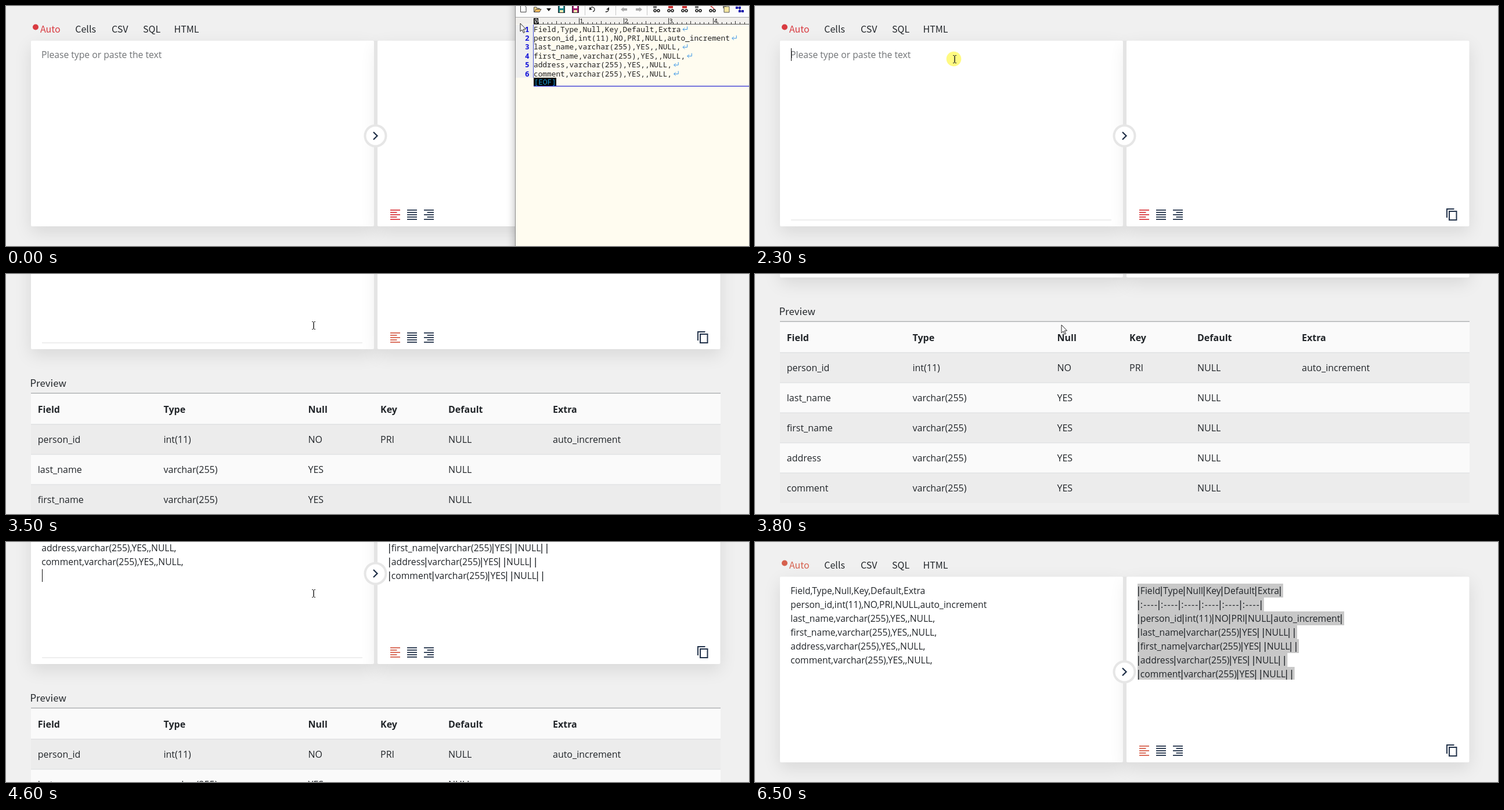
An HTML page with a canvas that plays this animation: 1280 px wide and 415 px high, repeating every 6600 ms.

```html
<!DOCTYPE html>
<html lang="en">
<head>
<meta charset="utf-8">
<title>CSV to Markdown table</title>
<style>
html, body { margin: 0; width: 100%; height: 100%; overflow: hidden; background: #f0f0f0; }
canvas { display: block; width: 1280px; height: 415px; }
</style>
</head>
<body>
<canvas id="stage" width="1280" height="415"></canvas>
<script>
const ctx = document.getElementById('stage').getContext('2d');
const LOOP = 6600, STEP = 100;
const NAVY = '#22324a', INK = '#212529';
const UI = "'Noto Sans CJK JP', 'Noto Sans', sans-serif";
const BODY = "'Open Sans', 'Noto Sans', sans-serif";
const MONO = "'Noto Sans Mono', 'DejaVu Sans Mono', monospace";

const csv = [
  'Field,Type,Null,Key,Default,Extra',
  'person_id,int(11),NO,PRI,NULL,auto_increment',
  'last_name,varchar(255),YES,,NULL,',
  'first_name,varchar(255),YES,,NULL,',
  'address,varchar(255),YES,,NULL,',
  'comment,varchar(255),YES,,NULL,'
];
const cells = csv.map(line => line.split(','));
const markdown = cells.map(row => '|' + row.map(c => c || ' ').join('|') + '|');
markdown.splice(1, 0, '|' + ':----|'.repeat(6));

const mousePath = [
  [0, 886, 31], [200, 909, 40], [800, 1172, 130], [1300, 1176, 137],
  [1500, 1120, 150], [2000, 344, 92], [2400, 344, 92], [2700, 530, 89],
  [4700, 530, 89], [4900, 570, 118], [5600, 1203, 360], [6100, 1203, 360],
  [6400, 1204, 372]
];
const scrollPath = [
  [2850, 0], [3500, 251], [3800, 375], [4250, 375], [4600, 170], [4900, 0]
];

// Linear interpolation along [time, ...values] points
function along(points, t) {
  let i = points.findIndex(p => p[0] > t);
  if (i < 0) return points[points.length - 1].slice(1);
  if (i === 0) return points[0].slice(1);
  const a = points[i - 1], b = points[i], k = (t - a[0]) / (b[0] - a[0]);
  return a.slice(1).map((v, n) => v + (b[n + 1] - v) * k);
}

function rect(x, y, w, h, color) {
  ctx.fillStyle = color;
  ctx.fillRect(x, y, w, h);
}

function text(s, x, y, font, color) {
  ctx.font = font;
  ctx.fillStyle = color;
  ctx.fillText(s, x, y);
}

function disc(x, y, r, color) {
  ctx.fillStyle = color;
  ctx.beginPath();
  ctx.arc(x, y, r, 0, 7);
  ctx.fill();
}

function path(points, closed) {
  ctx.beginPath();
  for (let i = 0; i < points.length; i += 2) ctx.lineTo(points[i], points[i + 1]);
  if (closed) ctx.closePath();
}

function stroke(points, color, width = 1, closed = false) {
  path(points, closed);
  ctx.strokeStyle = color;
  ctx.lineWidth = width;
  ctx.stroke();
}

function shape(points, fill, edge) {
  path(points, true);
  ctx.fillStyle = fill;
  ctx.fill();
  if (edge) {
    ctx.strokeStyle = edge;
    ctx.lineWidth = 1;
    ctx.stroke();
  }
}

function panel(x, w) {
  ctx.save();
  ctx.shadowColor = 'rgba(0,0,0,.1)';
  ctx.shadowBlur = 30;
  ctx.shadowOffsetY = 10;
  ctx.fillStyle = '#fff';
  ctx.beginPath();
  ctx.roundRect(x, 60, w, 321, 2);
  ctx.fill();
  ctx.restore();
}

function alignIcon(x, color, short, right) {
  for (let i = 0; i < 5; i++) {
    const w = short && i % 2 ? 11.5 : 17;
    rect(right ? x + 17 - w : x, 352 + i * 4, w, 1.8, color);
  }
}

// Draws pipes as narrow bars and returns the right end
function pipedLine(s, x, y) {
  ctx.letterSpacing = s[1] === ':' ? '1.2px' : '0px';
  s.split('|').forEach((part, i) => {
    if (i) {
      rect(x + 1, y - 13, 1.4, 17, INK);
      x += 4.8;
    }
    text(part, x, y, `500 15.7px ${BODY}`, INK);
    x += ctx.measureText(part).width;
  });
  ctx.letterSpacing = '0px';
  return x;
}

function output(selected) {
  markdown.forEach((line, i) => {
    const y = 90 + i * 24;
    const end = pipedLine(line, 659, y);
    if (!selected) return;
    rect(659, y - 18, end + 2 - 659, i < 6 ? 24 : 22, '#c8c8c8');
    pipedLine(line, 659, y);
  });
}

function table() {
  text('Preview', 41.5, 446, `500 16.8px ${UI}`, INK);
  rect(43, 458, 1188, 52, '#fafafa');
  rect(43, 456.5, 1188, 1.3, '#a9abad');
  const columns = [54.8, 271.5, 520.5, 645, 762, 942];
  cells.forEach((row, r) => {
    if (r) rect(43, 459 + r * 52, 1188, 52, r % 2 ? '#ececec' : '#fafafa');
    if (r) rect(43, 458.5 + r * 52, 1188, 1, '#dcdedf');
    const font = `${r ? 400 : 700} 16px ${BODY}`;
    row.forEach((s, c) => text(s, columns[c], r ? 491 + r * 52 : 490.5, font, INK));
  });
}

function page(t, scroll) {
  const pasted = t >= 2600;
  const focused = t >= 2200 && t < 4900;
  const accent = pasted ? '#d6604d' : '#d93b41';
  rect(0, 0, 1280, 415, '#f0f0f0');
  ctx.save();
  ctx.translate(0, -Math.round(scroll));

  disc(51, 36.5, 5, accent);
  const tabs = [['Auto', 59], ['Cells', 119.3], ['CSV', 182], ['SQL', 236], ['HTML', 289.5]];
  tabs.forEach(([s, x], i) => text(s, x, 46, `500 16px ${UI}`, i ? INK : accent));

  panel(43, 591);
  panel(640, 590.5);
  rect(634, 60, 6, 321, '#e4e4e4');
  if (focused) rect(62, 369.5, 552, 1, '#dedede');

  if (pasted) {
    csv.forEach((s, i) => text(s, 61.2, 90 + i * 24, `500 15.65px ${BODY}`, INK));
    output(t >= 5900);
  } else {
    text('Please type or paste the text', 61, 90, `500 15.7px ${BODY}`, '#707376');
  }
  const blink = (t - 2450) % 1060 < 530;
  if (t >= 2200 && t < 5600 && blink) rect(62, pasted ? 217 : 73, 1, 22, '#111');

  alignIcon(662, accent, true);
  alignIcon(691, NAVY);
  alignIcon(720, NAVY, true, true);
  stroke([1192, 366, 1192, 351, 1204.5, 351], NAVY, 2);
  stroke([1196, 355, 1208.5, 355, 1208.5, 370, 1196, 370], NAVY, 2, true);

  disc(636.5, 224.5, 20, '#e6e6e6');
  disc(636.5, 224.5, 16, '#fff');
  stroke([633, 218, 639.5, 224.5, 633, 231], NAVY, 2.3);

  if (pasted) table();
  ctx.restore();
}

function toolbar() {
  rect(878, 0, 402, 19, '#fcfcfc');
  shape([886.5, -2, 893, -2, 896, 2, 896, 10.5, 886.5, 10.5], '#fff', '#444');
  shape([909.5, 10.5, 909.5, 2, 914, 2, 915, 4, 919, 4, 919, 10.5], '#f3d58a', '#444');
  shape([910, 10.5, 913, 5.5, 922, 5.5, 919, 10.5], '#f6b95c', '#444');
  shape([931, 4, 939, 4, 935, 9], '#111');
  [[951, '#138086'], [975, '#a0186c']].forEach(([x, c]) => {
    rect(x, 0, 12, 12, '#222');
    rect(x + 1, 0, 10, 11, c);
    rect(x + 3, 0, 6, 4, '#fff');
    rect(x + 3, 7, 6, 4, '#f4e9b0');
  });
  [[1010, 1], [1034, -1]].forEach(([x, d]) => {
    ctx.strokeStyle = '#222';
    ctx.lineWidth = 1.3;
    ctx.beginPath();
    ctx.arc(x, 6, 4, d > 0 ? 3.5 : -0.3, d > 0 ? 7.6 : 1.9, false);
    ctx.stroke();
    shape([x - 5 * d, 2, x - 5 * d, 7, x, 6], '#222');
  });
  [[1059, 1], [1096, -1]].forEach(([x, d]) => {
    shape([x, 6, x + 5 * d, 2, x + 5 * d, 10], '#aaa');
    rect(d > 0 ? x + 5 : x - 11, 4, 6, 4, '#aaa');
  });
  [997, 1050, 1104].forEach(x => rect(x, 0, 1, 16, '#c8c8c8'));
  for (let i = 0; i < 6; i++) {
    const x = 1115 + i * 24;
    if (i === 1 || i === 2) rect(x + 2, 0, 8, 4, '#c33');
    else if (i === 4) stroke([x + 2, -1, x + 9, 5], '#c33', 1.5);
    else rect(x, 0, 6, 4, '#777');
    if (i === 5) {
      shape([x + 2, 1, x + 11, 1, x + 11, 11, x + 2, 11], '#f5e6a0', '#555');
    } else {
      disc(x + 3, 8, 2.8, '#222');
      disc(x + 9, 8, 2.8, '#222');
      rect(x + 2, 7, 2, 2, '#fff');
      rect(x + 8, 7, 2, 2, '#fff');
    }
  }
  stroke([1258, 3, 1264, 3, 1264, 9, 1269, 9], '#222');
  [[1257, 1], [1262, 1], [1262, 7], [1267, 7]].forEach(([x, y]) => rect(x, y, 4, 4, '#1010b0'));
}

function ruler() {
  rect(878, 19, 402, 1, '#a8a8a8');
  rect(878, 20, 402, 11, '#f1efec');
  for (let i = 0; i < 49; i++) {
    const h = i % 10 === 0 ? 10 : i % 5 === 0 ? 5 : 3;
    rect(Math.round(909.5 + i * 7.71), 31 - h, 1, h, '#333');
    if (i && i % 10 === 0) text(i / 10, 911 + i * 7.71, 30, `11px ${MONO}`, '#222');
  }
  rect(909, 31, 371, 1, '#555');
  rect(909, 21, 8, 10, '#000');
  text('0', 910, 30, `11px ${MONO}`, '#fff');
}

function returnMark(x, y) {
  const c = '#3b95e6';
  stroke([x + 10.5, y - 4, x + 10.5, y + 1, x + 3, y + 1], c);
  stroke([x + 6, y - 2, x + 3, y + 1, x + 6, y + 4], c);
}

function editor(t, mx, my) {
  const cw = 7.7, lh = 15.4, left = 909, top = 32;
  const dragging = t >= 200;
  const row = t > 1300 ? 6 : Math.floor((my - top + 1) / lh);
  const col = Math.max(0, Math.round((mx - left) / cw));

  ctx.save();
  ctx.shadowColor = 'rgba(0,0,0,.3)';
  ctx.shadowBlur = 14;
  rect(877, -20, 420, 460, '#8c8c8c');
  ctx.restore();
  rect(878, 0, 402, 415, '#fffcf0');
  toolbar();
  ruler();
  rect(878, top, 30, 92, '#efefef');
  rect(908, top, 1, 92, '#4050d8');

  csv.forEach((line, i) => {
    const y = top + i * lh, end = left + line.length * cw;
    if (dragging && i <= row) {
      const w = i < row ? (line.length + 2) * cw : Math.min(col, line.length) * cw;
      rect(left, y, w, lh, '#c0cde3');
    }
    text(i + 1, 894, y + 12.5, `700 12.8px ${MONO}`, '#1010d8');
    text(line, left, y + 12.5, `12.8px ${MONO}`, '#222');
    returnMark(end, y + 7.5);
  });
  rect(909, 124, 39, 15, '#000');
  text('[EOF]', 909.5, 136, `12.8px ${MONO}`, '#1698d8');
  if (!dragging) rect(909, 138, 371, 1.2, '#2222d0');
}

function beam(x, y) {
  stroke([x - 3, y - 6.5, x - 1, y - 6.5, x, y - 5.5, x, y + 5.5, x - 1, y + 6.5, x - 3, y + 6.5], '#222');
  stroke([x + 3, y - 6.5, x + 1, y - 6.5, x, y - 5.5, x, y + 5.5, x + 1, y + 6.5, x + 3, y + 6.5], '#222');
}

function arrow(x, y) {
  const p = [0, 0, 0, 14, 3, 11, 5.5, 16.5, 7.5, 15.5, 5.2, 10.2, 9.5, 10];
  shape(p.map((v, i) => v + (i % 2 ? y : x)), '#fff', '#222');
}

function hand(x, y) {
  const p = [-1.5, 0, 1, 0, 1, 6, 8, 8, 8, 13, 6, 17, -2, 17, -6, 10, -4, 9, -1.5, 11];
  shape(p.map((v, i) => v + (i % 2 ? y : x)), '#fff', '#222');
}

function cursor(t, x, y, scroll, editing) {
  if (t >= 6500) return;
  const clicking = (t >= 2100 && t < 2400) || (t >= 5700 && t < 5900);
  if (clicking) {
    ctx.globalCompositeOperation = 'multiply';
    disc(t < 3000 ? 342.5 : x, t < 3000 ? 91.5 : y, 12.8, '#fffa82');
    ctx.globalCompositeOperation = 'source-over';
  }
  const docY = y + scroll;
  const inLeft = x > 43 && x < 616 && docY > 60 && docY < 375;
  const inRight = x > 657 && x < 1230 && docY > 60 && docY < 340;
  if (editing ? x >= 909 : inLeft || inRight) beam(x, y);
  else if (x > 1186 && docY > 345 && !editing) hand(x - 1, y - 3);
  else arrow(x - (editing ? 0 : 2), y - 1);
}

function draw(t) {
  const [x, y] = along(mousePath, t);
  const [scroll] = along(scrollPath, t);
  const fade = Math.min(1, Math.max(0, (1600 - t) / 300));
  page(t, scroll);
  if (fade > 0) {
    ctx.save();
    ctx.globalAlpha = fade;
    ctx.translate(0, (1 - fade) * 30);
    editor(t, x, y);
    ctx.restore();
  }
  cursor(t, x, y, scroll, fade > 0);
}

function tick() {
  const t = performance.now() % LOOP;
  draw(Math.floor(t / STEP) * STEP);
  requestAnimationFrame(tick);
}
tick();
</script>
</body>
</html>
```
